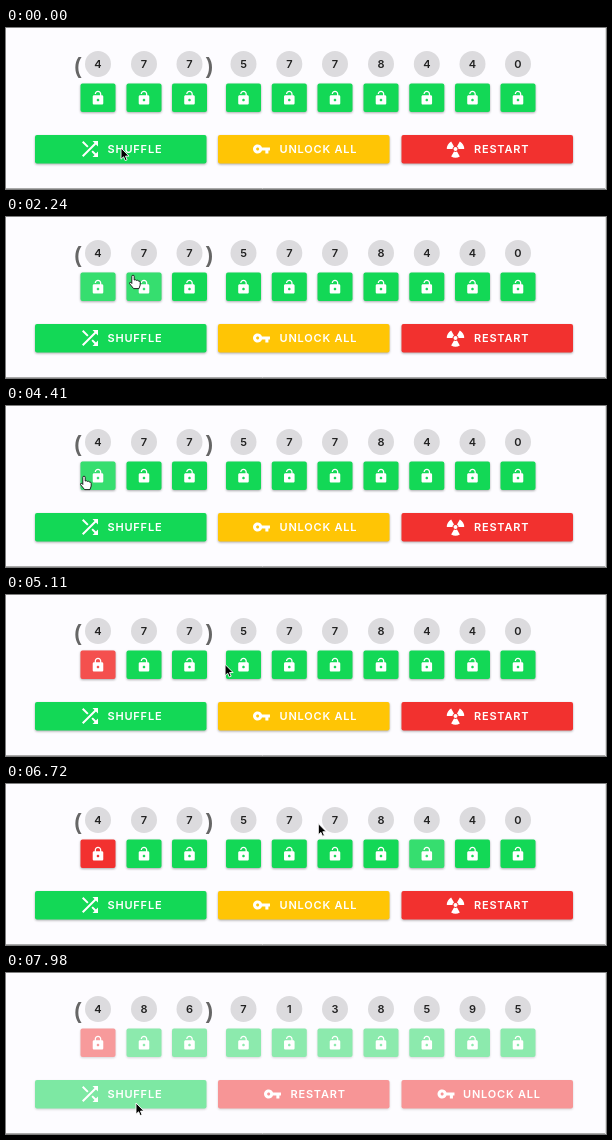
Recreate the animation shown at these times as an HTML page. Size 600 by 161 pixels, loop 8000 ms.

```html
<!DOCTYPE html>
<html lang="en">
<head>
<meta charset="utf-8">
<style>
  html, body { margin: 0; width: 100%; height: 100%; overflow: hidden; background: #fdfcff; }
  svg { display: block; width: 600px; height: 161px; }
  text { font: 600 11px Inter, sans-serif; }
  .label { fill: #fff; letter-spacing: .8px; }
  .digit { fill: #222; text-anchor: middle; }
  .paren { font: bold 22px "Liberation Sans", sans-serif; fill: #666; text-anchor: middle; }
  .button { filter: drop-shadow(0 1px 1px rgba(0, 0, 0, .32)); }
  .pressed { filter: drop-shadow(0 2.5px 2.5px rgba(0, 0, 0, .5)); }
</style>
</head>
<body>
<svg id="stage" viewBox="0 0 600 161"></svg>
<script>
const LOOP = 8000, STEP = 70, ROLL_START = 7700, ROLL_END = 7980;
const GREEN = '#13d856', RED = '#f2312f', YELLOW = '#ffc505';
const COLUMNS = [92, 138, 183.5, 237.5, 283.3, 329, 375, 420.8, 466.5, 512];
const BEFORE = '4775778440', AFTER = '4867138595';

const LOCK_BODY = 'M12 17c1.1 0 2-.9 2-2s-.9-2-2-2-2 .9-2 2 .9 2 2 2zm6-9h-1V6c0-2.76-2.24-5-5-5S7 3.24 7 6';
const LOCK_BASE = 'c-1.1 0-2 .9-2 2v10c0 1.1.9 2 2 2h12c1.1 0 2-.9 2-2V10c0-1.1-.9-2-2-2z';
const ICONS = {
  open: LOCK_BODY + 'h1.9c0-1.71 1.39-3.1 3.1-3.1s3.1 1.39 3.1 3.1v2H6' + LOCK_BASE,
  locked: LOCK_BODY + 'v2H6' + LOCK_BASE + 'M15.1 8H8.9V6c0-1.71 1.39-3.1 3.1-3.1s3.1 1.39 3.1 3.1z',
  shuffle: 'M10.59 9.17L5.41 4 4 5.41l5.17 5.17zM14.5 4l2.04 2.04L4 18.59 5.41 20 17.96 7.46 20 9.5V4zm.33 9.41l-1.41 1.41 3.13 3.13L14.5 20H20v-5.5l-2.04 2.04z',
  key: 'M12.65 10C11.83 7.67 9.61 6 7 6c-3.31 0-6 2.69-6 6s2.69 6 6 6c2.61 0 4.83-1.67 5.65-4H17v4h4v-4h2v-4zM7 14c-1.1 0-2-.9-2-2s.9-2 2-2 2 .9 2 2-.9 2-2 2z',
  hazard: [150, 270, 30].map(blade).join('') + 'M14 12a2 2 0 1 1-4 0a2 2 0 1 1 4 0z'
};
const ARROW = 'M0 0V11.2L2.6 8.8 4.2 12.6 6.1 11.8 4.5 8.1H8z';
const HAND = 'M-1.2 8.5V1.4a1.2 1.2 0 0 1 2.4 0V5q1.6-.6 2.1.4q1.5-.5 2 .5q1.9-.2 1.9 1.5V10L6 13.6H.6L-3.4 8.7q-.3-1.7 1.2-1.4z';

// Pointer stops: time, x, y
const PATH = [
  [0, 115, 120], [250, 115, 120], [770, 95, 66], [910, 95, 65], [1900, 95, 66],
  [2240, 127, 58], [3000, 500, 68], [3500, 500, 68], [4200, 90, 72], [4410, 78, 70],
  [4650, 85, 69], [4900, 88, 69], [5390, 421, 70], [5600, 423, 70], [5810, 444, 75],
  [6100, 424, 70], [6400, 422, 69], [6750, 310, 39], [7350, 140, 126],
  [7630, 129, 131], [8000, 130, 130]
];

function blade(angle) {
  const point = (r, a) => {
    const rad = a * Math.PI / 180;
    return `${12 + r * Math.cos(rad)} ${12 - r * Math.sin(rad)}`;
  };
  return `M${point(3, angle - 30)}L${point(8.7, angle - 30)}` +
    `A8.7 8.7 0 0 0 ${point(8.7, angle + 30)}L${point(3, angle + 30)}A3 3 0 0 1 ${point(3, angle - 30)}z`;
}

const between = (t, from, to) => t >= from && t < to;

function pointerAt(t) {
  const next = PATH.findIndex(stop => stop[0] > t);
  const [t0, x0, y0] = PATH[next - 1], [t1, x1, y1] = PATH[next];
  const u = (t - t0) / (t1 - t0), ease = u * u * (3 - 2 * u);
  return { x: x0 + (x1 - x0) * ease, y: y0 + (y1 - y0) * ease };
}

function digitAt(i, t) {
  if (i === 0 || t < ROLL_START) return BEFORE[i];
  if (t >= ROLL_END) return AFTER[i];
  const noise = Math.sin(i * 12.9898 + t * 0.78233) * 43758.5453;
  return Math.floor((noise - Math.floor(noise)) * 10);
}

const isLocked = (i, t) =>
  i === 0 ? between(t, 1050, 1800) || t >= 4760 :
  i === 7 && between(t, 5530, 6300);

function focusedAt(t) {
  if (between(t, 910, 5530)) return 0;
  return between(t, 5530, 7000) ? 7 : -1;
}

const icon = (name, x, y, scale) =>
  `<path d="${ICONS[name]}" fill="#fff" fill-rule="evenodd" transform="translate(${x} ${y}) scale(${scale}) translate(-12 -12)"/>`;

function button({ x, y, w, h, color, lit, pressed, opacity }) {
  const rect = fill => `<rect x="${x}" y="${y}" width="${w}" height="${h}" rx="2" ${fill}/>`;
  return `<g class="${pressed ? 'pressed' : 'button'}" opacity="${opacity}">` +
    rect(`fill="${color}"`) + (lit ? rect('fill="#fff" opacity=".15"') : '') + '</g>';
}

function draw(t) {
  const rolling = t >= ROLL_START;
  const pointer = pointerAt(t);
  const active = t >= 200 && !rolling;
  const focused = focusedAt(t);
  let hand = false;

  const hovered = ({ x, y, w, h }) => {
    const over = active && between(pointer.x, x, x + w) && between(pointer.y, y, y + h);
    hand ||= over;
    return over;
  };

  let out = '<rect width="600" height="161" fill="#fdfcff"/>' +
    '<path d="M0 160.5H600" stroke="#aaa"/><path d="M599.5 0V161" stroke="#ddd"/>' +
    '<text class="paren" x="72" y="44.5">(</text><text class="paren" x="203.5" y="44.5">)</text>';

  COLUMNS.forEach((cx, i) => {
    const box = { x: cx - 17.5, y: 55.5, w: 35, h: 28.5 };
    const locked = isLocked(i, t);
    const over = hovered(box);
    out += `<circle cx="${cx}" cy="36" r="13" fill="#dcdbde"/>` +
      `<text class="digit" x="${cx}" y="40">${digitAt(i, t)}</text>` +
      button({
        ...box,
        color: locked ? RED : GREEN,
        lit: !rolling && (over || focused === i),
        pressed: i === 0 && between(t, 840, 1050),
        opacity: rolling ? .48 : 1
      }) + icon(locked ? 'locked' : 'open', cx, 70, .66);
  });

  const actions = [
    { x: 29, color: GREEN, name: 'shuffle', iconX: 84, scale: 1, textX: 101.5, label: 'SHUFFLE', fade: .54 },
    ...(rolling ? [
      { x: 212, color: RED, name: 'key', iconX: 266.5, scale: .77, textX: 284.5, label: 'RESTART' },
      { x: 395.5, color: RED, name: 'key', iconX: 440, scale: .77, textX: 457, label: 'UNLOCK ALL' }
    ] : [
      { x: 212, color: YELLOW, name: 'key', iconX: 255.5, scale: .77, textX: 273.5, label: 'UNLOCK ALL' },
      { x: 395.5, color: RED, name: 'hazard', iconX: 449.5, scale: 1, textX: 468, label: 'RESTART' }
    ])
  ];
  for (const { x, color, name, iconX, scale, textX, label, fade = .5 } of actions) {
    const box = { x, y: 107, w: 171.5, h: 28.5 };
    out += button({ ...box, color, lit: hovered(box), opacity: rolling ? fade : 1 }) +
      icon(name, iconX, 121, scale) +
      `<text class="label" x="${textX}" y="125">${label}</text>`;
  }

  const look = hand ? 'fill="#fff" stroke="#111"' : 'fill="#000" stroke="#fff"';
  out += `<path d="${hand ? HAND : ARROW}" ${look} stroke-width=".9" stroke-linejoin="round" ` +
    `transform="translate(${pointer.x} ${pointer.y})"/>`;
  return out;
}

const stage = document.getElementById('stage');
let shown = -1;

function tick() {
  const t = Math.floor(performance.now() % LOOP / STEP) * STEP;
  if (t !== shown) stage.innerHTML = draw(shown = t);
  requestAnimationFrame(tick);
}
tick();
</script>
</body>
</html>
```
